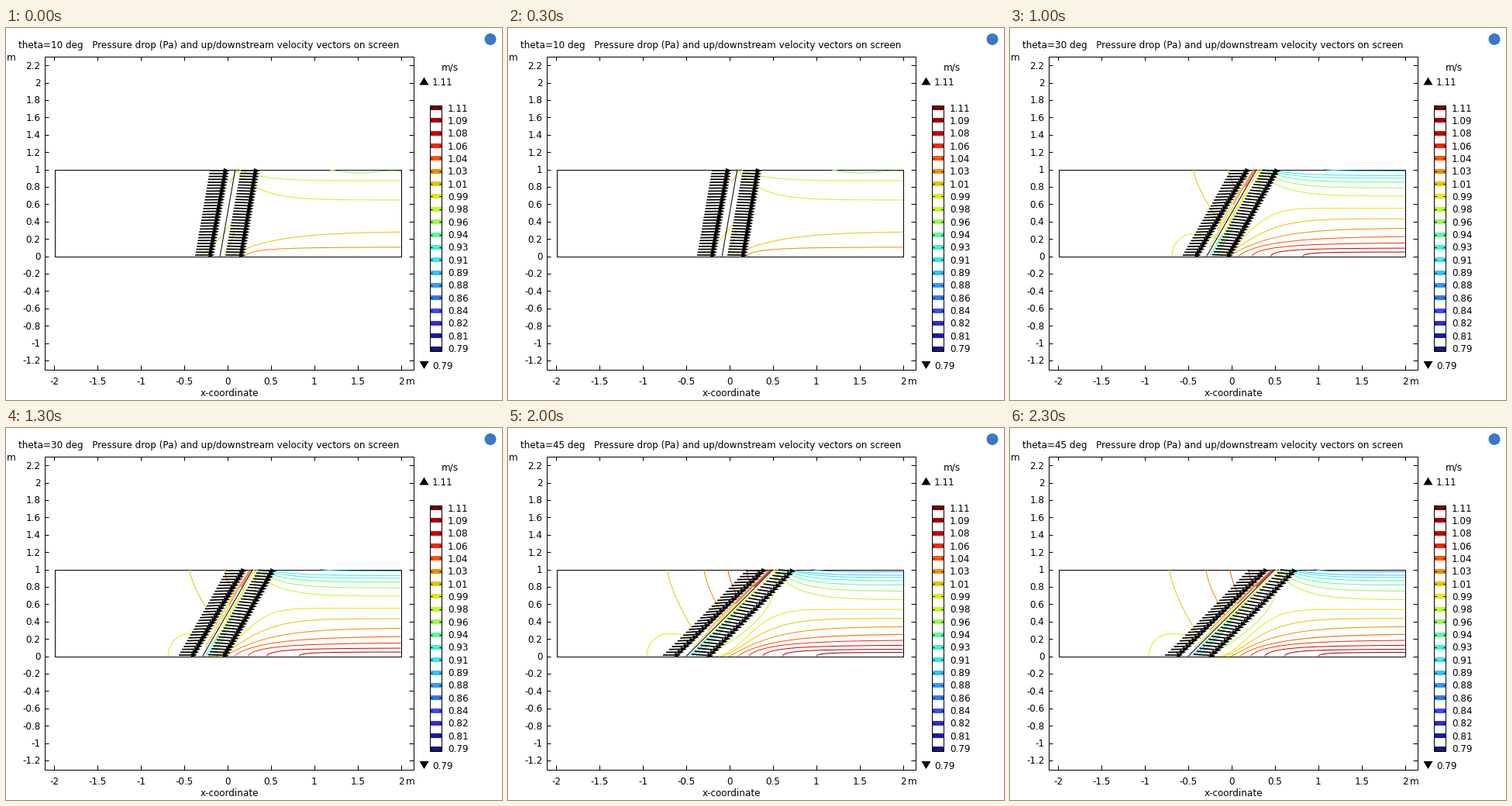
A matplotlib script that plays this animation: 640 px wide and 480 px high, repeating every 2500 ms.

```python
import numpy as np
import matplotlib.pyplot as plt
from matplotlib.animation import FuncAnimation
from matplotlib.collections import LineCollection, PolyCollection
from matplotlib.patches import Circle, Polygon, Rectangle

W, H, DPI = 640, 480, 100
PX = 72 / DPI
LEFT, RIGHT, TOP, FLOOR = 62.5, 509.5, 182.5, 294.5
ANGLES = [10, 20, 30, 40, 45]
ROWS = 30

COLORS = ("#800000 #a80000 #d40000 #fb2800 #fb5800 #f08c00 #ecc400 "
          "#e6e614 #bcfa28 #96fa50 #5cfa96 #3cf5d0 #32e6f0 #32c3fa "
          "#329bfa #3278fa #3250fa #2d2de6 #1919be #191982").split()
SPEEDS = [f"{1.1105 - .0168 * k:.2f}" for k in range(len(COLORS))]

# Fast wake: first level, count, root height, root step, first x, x spread
FAST = [(5, 2, 3.46, 2.2, 309, 27), (3, 4, 2.75, 1.22, 323, 36),
        (1, 7, 2.35, .92, 378, 60), (0, 8, 2.24, .79, 397, 66),
        (0, 8, 2.24, .79, 398, 63)]
# Slow wake: first level, count, depth, ratio
SLOW = [(7, 2, 39.5, .37), (7, 4, 47.5, .6), (8, 5, 34.5, .69),
        (8, 6, 37.5, .72), (8, 6, 39, .72)]
# Slowest contour along the top wall: start x, depth
SKIN = [None, (370, 6.5), (405, 2), (412, 2), (392, 3)]
# Upstream contours: where they leave the top wall, from level 6 upwards
ARCS = [(), (258, 288), (237, 282, 303), (217, 264, 294, 312),
        (206, 253, 284, 308, 322)]
# Upstream arch: where it leaves the floor
ARCH = [None, 229, 209, 190, 179]

# Contours around the least tilted screen
CALM = [(9, (418, 183), (435, 185.5), (460, 187), (490, 184.5), (510, 184.5)),
        (7, (253, 294), (277, 270), (290, 254), (294, 264), (283, 294)),
        (6, (280, 183), (284, 194), (290, 197), (297, 184))]

# Contours hugging the screen: level at full tilt, x offset, height range
SEAMS = [(1, -2, .8, 1), (3, -4, .6, 1), (5, -6, .3, .85), (6, -3, .1, .6),
         (7, 3, .4, 1), (9, 5, .15, .75), (10, 9, .1, .5), (11, 13, 0, .4),
         (12, 4, 0, .25), (13, 8, 0, .12)]


def smooth(points, n=10):
    """Catmull-Rom curve through the points."""
    p = np.array(points, float)
    p = np.vstack([2 * p[0] - p[1], p, 2 * p[-1] - p[-2]])
    t = np.linspace(0, 1, n)[:, None]
    parts = []
    for a, b, c, d in zip(p, p[1:], p[2:], p[3:]):
        parts.append(b + .5 * t * (c - a + t * (2 * a - 5 * b + 4 * c - d
                                                + t * (3 * (b - c) + d - a))))
    return np.vstack(parts)


def bezier(a, b, c, d):
    t = np.linspace(0, 1, 40)[:, None]
    a, b, c, d = np.array([a, b, c, d], float)
    s = 1 - t
    return a * s**3 + 3 * b * s * s * t + 3 * c * s * t * t + d * t**3


def wake(x0, wall, rise, decay, power=1):
    """Curve leaving a wall and settling at a distance from it."""
    x = x0 + (RIGHT - x0) * np.linspace(0, 1, 120) ** 1.6
    y = wall + rise * (1 - np.exp(-((x - x0) / decay) ** power))
    return np.column_stack([x, y])


def screen_x(y, slope):
    return 286 + slope * ((TOP + FLOOR) / 2 - y)


def arc(x0, slope):
    """Curve from the top wall down to the screen."""
    drop = (screen_x(TOP, slope) - x0) * (1.13 - .47 * slope)
    s = np.linspace(0, 1, 30)
    reach = screen_x(TOP + drop, slope) - 6 - x0
    return np.column_stack([x0 + reach * s**1.45, TOP + drop * s])


def arch(x0):
    a = np.radians(np.linspace(0, 122, 40))
    c = np.cos(a)
    x = x0 + 28 - np.where(c > 0, 28, 55) * c
    return np.column_stack([x, FLOOR - 29 * np.sin(a)])


def contours(i, slope):
    lines, colors = [], []

    def add(level, line):
        lines.append(line)
        colors.append(COLORS[level])

    foot, head = screen_x(FLOOR, slope), screen_x(TOP, slope)
    first, count, root, step, x0, spread = FAST[i]
    for k in range(count):
        h = (root + step * k) ** 2
        add(first + k, wake(x0 - spread * np.log(k + 1), FLOOR, -h,
                            min(9 + 1.8 * (h - 5), 56), .55 + (h / 50) ** 2))
    first, count, depth, ratio = SLOW[i]
    for k in range(count):
        add(first + k, wake(head + 4.5 * k, TOP, depth * ratio**k, 31))

    if i == 0:
        for level, *points in CALM:
            add(level, smooth(points))
    else:
        x0, depth = SKIN[i]
        add(first + count, wake(x0, TOP, depth, 18))
        for k, x0 in enumerate(ARCS[i]):
            add(6 - k, arc(x0, slope))
        add(7, arch(ARCH[i]))
        for level, dx, low, high in SEAMS:
            y = FLOOR - (FLOOR - TOP) * np.array([low, high])
            tilt = 7 + round((level - 7) * (.4 + .6 * slope))
            add(tilt, np.column_stack([screen_x(y, slope) + dx, y]))
    if i == 1:
        add(2, np.array([(443, 294), (470, 294)]))
    if i > 1:
        add(8, bezier((foot + 26, 294), (foot + .8 * (head - foot), 260),
                      (head + 10, 225), (head + 2, 186)))
    return LineCollection(lines, colors=colors, linewidths=PX, zorder=2)


def arrows(slope):
    t = np.linspace(0, 1, ROWS)
    y = 293 - 109 * t
    mid = np.sin(np.pi * t)
    shafts, heads = [], []
    for side in (-1, 1):
        length = 25.5 - side * slope * 2.8 * (2 * t - 1)
        drop = slope * (-2 * mid if side < 0 else 2 + 2.5 * mid)
        x = screen_x(y, slope) + side * 19.7
        tail = np.column_stack([x - length / 2, y - drop / 2])
        tip = np.column_stack([x + length / 2, y + drop / 2])
        unit = (tip - tail) / np.hypot(*(tip - tail).T)[:, None]
        normal = unit[:, ::-1] * [-1, 1]
        base = tip - 8 * unit
        shafts += list(np.stack([tail, base], 1))
        heads += list(np.stack([tip, base + 3.2 * normal, base - 3.2 * normal], 1))
    return [LineCollection(shafts, colors="k", linewidths=1.7 * PX, zorder=3),
            PolyCollection(heads, facecolors="k", edgecolors="none", zorder=3)]


plt.rcParams["font.family"] = "DejaVu Sans"
fig = plt.figure(figsize=(W / DPI, H / DPI), dpi=DPI, facecolor="white")
ax = fig.add_axes([0, 0, 1, 1])
ax.set_xlim(0, W)
ax.set_ylim(H, 0)
ax.axis("off")


def line(x, y):
    ax.plot(x, y, color="k", lw=PX, zorder=4, solid_capstyle="butt")


def box(x0, y0, x1, y1, z=4):
    ax.add_patch(Rectangle((x0, y0), x1 - x0, y1 - y0, fill=False,
                           ec="k", lw=PX, zorder=z))


def label(x, y, text, ha="center"):
    return ax.text(x, y + 4.5, text, ha=ha, va="baseline", size=12.05 * PX)


def pointer(base, tip):
    ax.add_patch(Polygon([(533.5, base), (545.5, base), (539.5, tip)],
                         fc="k", ec="none"))


# Axes frame
box(49.5, 36.5, 525.5, 440.5)
for k in range(-4, 5):
    x = 286 + k * 55.9
    line([x, x], [440.5, 435])
    line([x, x], [36.5, 42])
    label(x, 455, f"{k / 2:g}")
for k in range(-6, 12):
    y = FLOOR - k * 22.4
    line([49.5, 55], [y, y])
    line([525.5, 520], [y, y])
    label(44.5, y, f"{k / 5:g}", "right")
label(522, 455, "m")
label(7, 37.5, "m")
label(288, 470.5, "x-coordinate")
title = label(15.5, 21.5, "", "left")

# Channel
box(LEFT, TOP, RIGHT, FLOOR, 1.5)

# Colour legend
label(573, 50.5, "m/s")
for k, (speed, color) in enumerate(zip(SPEEDS, COLORS)):
    y = 103 + 16.35 * k
    ax.add_patch(Rectangle((547, y - 3), 15, 6, fc=color, ec="none"))
    line([547, 550], [y, y])
    line([559, 562], [y, y])
    label(570, y, speed, "left")
box(547, 100, 562, 416.5)
pointer(73.5, 63.5)
pointer(430, 440)
label(550, 70, SPEEDS[0], "left")
label(550, 435, SPEEDS[-1], "left")

ax.add_patch(Circle((625, 14.5), 7.5, fc="#3a78c8", ec="none"))

moving = []


def draw(i):
    while moving:
        moving.pop().remove()
    slope = np.tan(np.radians(ANGLES[i]))
    title.set_text(f"theta={ANGLES[i]} deg   Pressure drop (Pa) and "
                   "up/downstream velocity vectors on screen")
    ends = np.array([FLOOR, TOP])
    screen = LineCollection([np.column_stack([screen_x(ends, slope), ends])],
                            colors="k", linewidths=PX, zorder=3)
    for artist in [contours(i, slope), screen, *arrows(slope)]:
        ax.add_collection(artist, autolim=False)
        moving.append(artist)
    return [title, *moving]


anim = FuncAnimation(fig, draw, frames=len(ANGLES), interval=500, repeat=True)
plt.show()
```
